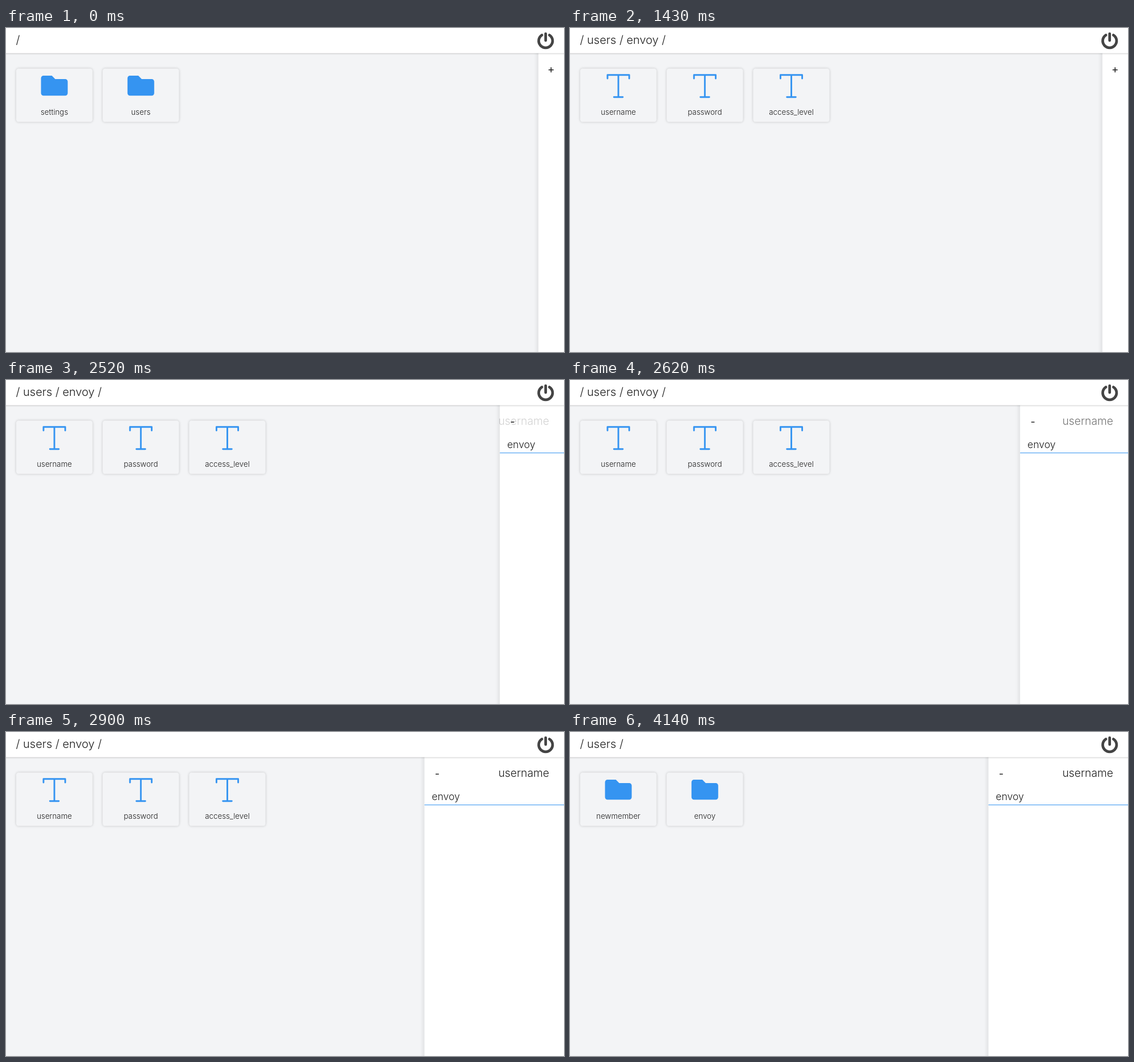
Recreate the animation shown at these times as an HTML page. Size 982 by 571 pixels, loop 5 s.

```html
<!DOCTYPE html>
<html lang="en">
<head>
<meta charset="utf-8">
<title>File browser</title>
<style>
  html, body { margin: 0; width: 100%; height: 100%; overflow: hidden; background: #f3f4f6; }
  svg { display: block; }
  text { font-family: Inter, "Open Sans", sans-serif; font-weight: 300; fill: #1f1f1f; white-space: pre; }
  .path { font-size: 20px; }
  .label { font-size: 13.3px; text-anchor: middle; }
  .title { font-size: 19.3px; text-anchor: end; }
  .value { font-size: 17.6px; }
  .toggle { font-weight: 400; text-anchor: middle; }
  .box { fill: #f3f4f6; filter: drop-shadow(0 0 2.2px rgba(0, 0, 0, .2)); }
  .header { fill: #fff; filter: drop-shadow(0 1px 1.3px rgba(0, 0, 0, .2)); }
  .side { fill: #fff; filter: drop-shadow(-4px 0 2.2px rgba(0, 0, 0, .06)); }
  .folder { fill: #3594f1; }
  .type { fill: none; stroke: #3594f1; stroke-width: 2.9; stroke-linecap: round; stroke-linejoin: round; }
  .power { fill: none; stroke: #444; stroke-width: 4.7; stroke-linecap: round; }
</style>
</head>
<body>
<svg width="982" height="571" viewBox="0 0 982 571">
  <defs>
    <path id="folder" class="folder" d="M-19.1 84h14.7l5.9 5.9h17.6a4.4 4.4 0 0 1 4.4 4.4v20.5a4.4 4.4 0 0 1-4.4 4.4h-38.2a4.4 4.4 0 0 1-4.4-4.4v-26.4a4.4 4.4 0 0 1 4.4-4.4z"/>
    <path id="type" class="type" d="M-19.1 89V82.7H19.1V89M0 82.7V121.7M-7.8 121.7H7.8"/>
    <clipPath id="valueClip"><rect id="valueRect" x="13.5" y="98" height="30"/></clipPath>
  </defs>
  <rect width="982" height="571" fill="#f3f4f6"/>
  <g id="cards"></g>
  <g id="panel">
    <rect class="side" y="30" width="270" height="560"/>
    <text id="toggle" class="toggle" x="22.4"></text>
    <g id="field">
      <g clip-path="url(#valueClip)"><text class="value" x="12.8" y="120">envoy</text></g>
      <rect y="128" width="270" height="1" fill="#3594f1"/>
    </g>
  </g>
  <text id="title" class="title" x="956" y="79">username</text>
  <rect class="header" x="-10" y="-10" width="1002" height="54.4"/>
  <text id="path" class="path" x="17.5" y="28"></text>
  <path class="power" d="M943.1 12.4A12.2 12.2 0 1 0 956.3 12.4M949.7 10V22"/>
</svg>
<script>
  const LOOP = 5000;
  const OPEN_AT = 2430, OPEN_STEPS = 10, STEP = 47;
  const SLIDE_START = 2416, SLIDE_TIME = 475;
  const CLOSED = 45, OPENED = 245.5;

  const folders = {
    root: ['folder', 'settings', 'users'],
    users: ['folder', 'newmember', 'envoy'],
    account: ['type', 'username', 'password', 'access_level']
  };
  // [start, path, folder]
  const views = [
    [0, '/', 'root'],
    [480, '/ users /', 'root'],
    [520, '/ users /', 'users'],
    [1430, '/ users / envoy /', 'account'],
    [4100, '/ users /', 'account'],
    [4140, '/ users /', 'users']
  ];

  const el = id => document.getElementById(id);
  const [cards, panel, toggle, field, valueRect, title, path] =
    ['cards', 'panel', 'toggle', 'field', 'valueRect', 'title', 'path'].map(el);

  const card = (icon, label, i) => `
    <g transform="translate(${85.1 + 152.2 * i} 0)">
      <rect class="box" x="-67.2" y="71.5" width="134.4" height="94" rx="4.5"/>
      <use href="#${icon}"/>
      <text class="label" y="153">${label}</text>
    </g>`;

  // cubic-bezier(.25, .1, .25, 1)
  function ease(x) {
    if (x <= 0 || x >= 1) return x <= 0 ? 0 : 1;
    let lo = 0, hi = 1;
    for (let i = 0; i < 24; i++) {
      const s = (lo + hi) / 2;
      if (.75 * s * (1 - s) + s ** 3 < x) lo = s; else hi = s;
    }
    return .3 * lo * (1 - lo) ** 2 + 3 * lo ** 2 * (1 - lo) + lo ** 3;
  }

  // The slide advances in short ticks rounded to 10 ms.
  function slide(t) {
    if (t < OPEN_AT) return 0;
    let tick = OPEN_AT;
    for (let k = 1; k <= OPEN_STEPS; k++) {
      const next = OPEN_AT + Math.round(k * STEP / 10) * 10;
      if (next <= t) tick = next;
    }
    return ease((tick - SLIDE_START) / SLIDE_TIME);
  }

  let shown;
  function draw(t) {
    const view = views.filter(v => v[0] <= t).pop();
    if (view !== shown) {
      const [icon, ...labels] = folders[view[2]];
      path.textContent = view[1];
      cards.innerHTML = labels.map((label, i) => card(icon, label, i)).join('');
      shown = view;
    }
    const open = t >= OPEN_AT, p = slide(t);
    const width = CLOSED + (OPENED - CLOSED) * p;
    panel.setAttribute('transform', `translate(${982 - width} 0)`);
    valueRect.setAttribute('width', width - 27);
    field.style.display = open ? '' : 'none';
    title.style.opacity = p ** 1.5;
    toggle.textContent = open ? '-' : '+';
    toggle.setAttribute('y', open ? 80 : 79);
    toggle.style.fontSize = open ? '18px' : '19px';
  }

  const start = performance.now();
  function loop() {
    draw((performance.now() - start) % LOOP);
    requestAnimationFrame(loop);
  }
  loop();
</script>
</body>
</html>
```
